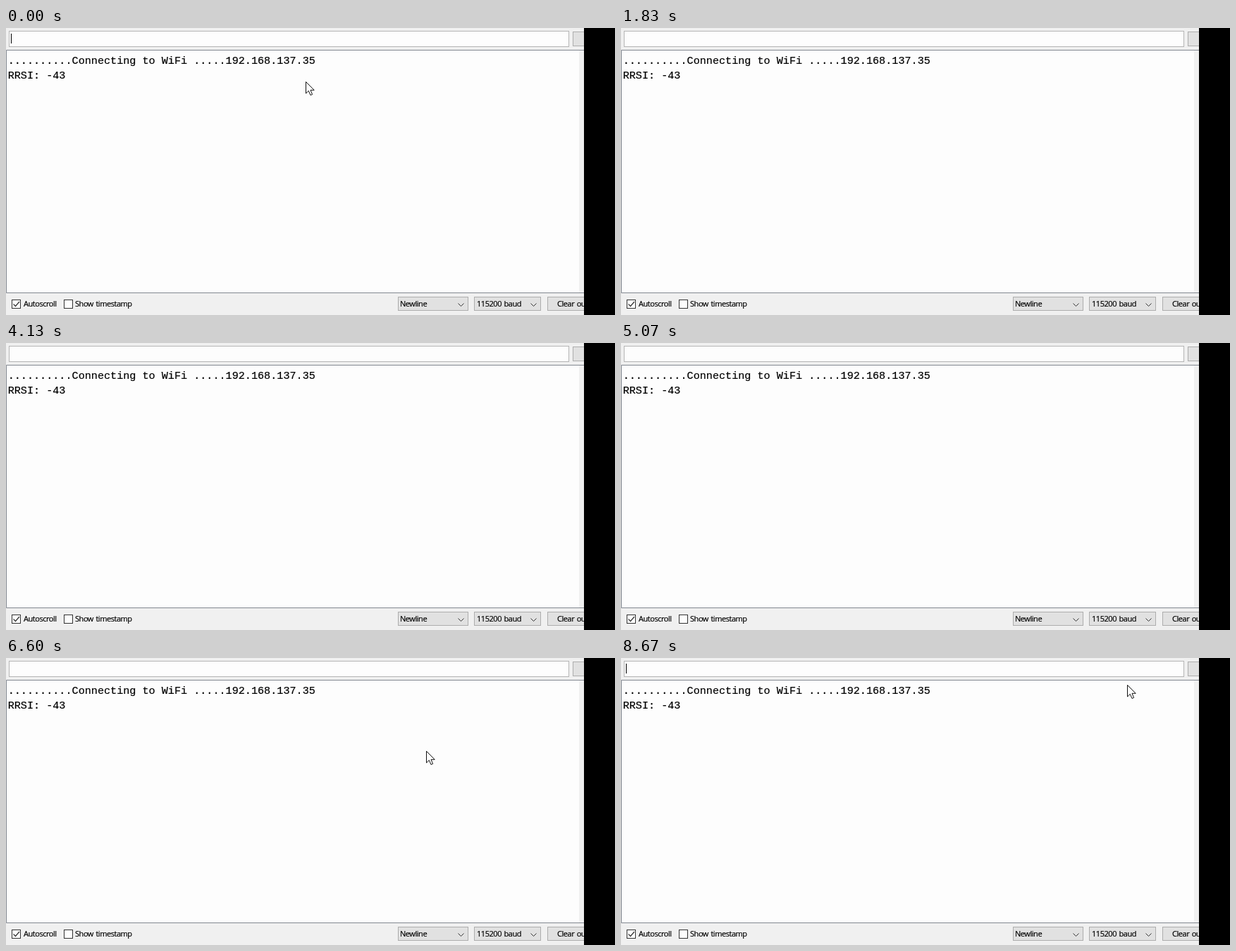
Write an HTML page that moves like this. It is 864 px wide and 408 px high and loops after 8700 ms.

```html
<!DOCTYPE html>
<html lang="en">
<head>
<meta charset="utf-8">
<title>Serial monitor</title>
<style>
  html, body { margin: 0; width: 100%; height: 100%; overflow: hidden; background: #000; }
  svg { display: block; width: 864px; height: 408px; }
  .panel { fill: #f0f0f0; }
  .paper { fill: #fdfdfd; }
  .box { fill: #e1e1e1; stroke: #adadad; }
  .line { fill: none; stroke: #333; }
  .edge { fill: none; stroke: #828790; }
  text { white-space: pre; fill: #000; stroke: #000; stroke-width: .2px; }
  .log text { font: 15.15px "Courier New", "Liberation Mono", monospace; }
  .ui text { font: 11px "Open Sans", "Noto Sans", sans-serif; letter-spacing: -.45px; word-spacing: 1px; }
</style>
</head>
<body>
<svg viewBox="0 0 864 408">
  <defs><clipPath id="win"><rect width="820" height="408"/></clipPath></defs>
  <rect width="864" height="408"/>
  <g clip-path="url(#win)">
    <rect class="panel" width="820" height="408"/>
    <rect class="paper" x="4.5" y="4.5" width="794" height="22" stroke="#b4b4b4"/>
    <rect class="box" x="804.5" y="5.5" width="30" height="20"/>
    <rect class="paper" y="32" width="813" height="344"/>
    <path class="edge" d="M820 31.5H.5V376.5H820"/>

    <g class="log">
      <text x="2.7" y="51">..........Connecting to WiFi .....192.168.137.35</text>
      <text x="2.7" y="72">RRSI: -43</text>
    </g>

    <g class="ui">
      <rect class="paper" x="8.5" y="386.5" width="12" height="12" stroke="#333"/>
      <path class="line" d="M10.5 392.5l3 3 5.5-6.5" stroke-width="1.2"/>
      <text x="25" y="396">Autoscroll</text>
      <rect class="paper" x="82.5" y="386.5" width="12" height="12" stroke="#333"/>
      <text x="98" y="396">Show timestamp</text>

      <rect class="box" x="556.5" y="382.5" width="99" height="19"/>
      <text x="559" y="396">Newline</text>
      <path class="line" d="M641.5 391.5l4 4 4-4"/>
      <rect class="box" x="664.5" y="382.5" width="94" height="19"/>
      <text x="668" y="396">115200 baud</text>
      <path class="line" d="M744.5 391.5l4 4 4-4"/>
      <rect class="box" x="768.5" y="382.5" width="80" height="19"/>
      <text x="782" y="396">Clear output</text>
    </g>

    <path id="caret" d="M7.5 8V22" stroke="#000"/>
    <path id="pointer" d="M.5 .5V17L4.3 13.3 7 19.5 9.6 18.4 7 12.3H12.2Z" fill="#fdfdfd" stroke="#111"/>
  </g>
</svg>
<script>
  const LOOP = 8700;
  const caret = document.getElementById('caret');
  const pointer = document.getElementById('pointer');

  // Pointer stops: time, x, y; it is below the window between 800 and 5700 ms.
  const stops = [
    [0, 425, 76], [200, 425, 76], [800, 330, 410], [5700, 238, 410],
    [5940, 251, 374], [6900, 700, 60], [7340, 730, 33], [8000, 718, 38], [LOOP, 718, 38]
  ];
  // Spans during which the caret shows; the field has no focus in the middle.
  const caretOn = [[0, 400], [930, 1460], [1990, 2520], [8140, LOOP]];

  function pointerAt(t) {
    const i = stops.findIndex(s => s[0] > t);
    const [t0, x0, y0] = stops[i - 1], [t1, x1, y1] = stops[i];
    const k = (t - t0) / (t1 - t0), e = k * k * (3 - 2 * k);
    return [x0 + (x1 - x0) * e, y0 + (y1 - y0) * e].map(Math.round);
  }

  function draw(now) {
    const t = now % LOOP;
    pointer.setAttribute('transform', `translate(${pointerAt(t)})`);
    caret.style.display = caretOn.some(([a, b]) => t >= a && t < b) ? '' : 'none';
    requestAnimationFrame(draw);
  }
  draw(0);
</script>
</body>
</html>
```
